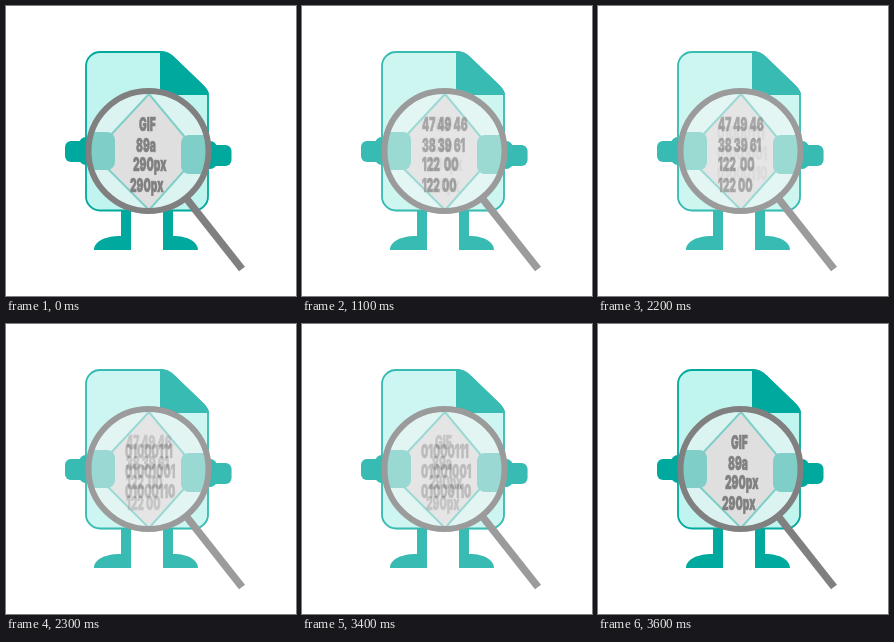
An HTML page that plays this animation: 290x290 px, repeating every 3.7 s.

```html
<!DOCTYPE html>
<html lang="en">
<head>
<meta charset="utf-8">
<title>File under a magnifier</title>
<style>
  html, body { margin: 0; width: 100%; height: 100%; overflow: hidden; background: #fff; }
  svg { display: block; width: 290px; height: 290px; }
  text { font: 900 19px Inter, sans-serif; fill: #808080; stroke: #808080; stroke-width: .7; white-space: pre; }
</style>
</head>
<body>
<svg viewBox="0 0 290 290">
  <defs>
    <clipPath id="glass"><circle cx="142.5" cy="145" r="61"/></clipPath>
    <g id="scene">
      <g fill="#00a99d">
        <!-- legs -->
        <path d="M115 204H125V244H88C88 236 98 230 115 230Z"/>
        <path d="M157 204H167V230C182 230 192 236 192 244H157Z"/>
        <!-- hands -->
        <rect x="59" y="135" width="40" height="21" rx="6"/>
        <rect x="73" y="131" width="30" height="28" rx="7"/>
        <rect x="186" y="139" width="39.5" height="21" rx="6"/>
        <rect x="184" y="135" width="27" height="28" rx="7"/>
      </g>
      <!-- page with folded corner -->
      <path d="M94 46H155Q162 46 168 52L197 80Q202 85 202 90V190A14 14 0 0 1 188 204.5H94A14 14 0 0 1 80 190V60A14 14 0 0 1 94 46Z"
        fill="#c0f4ee" stroke="#00a99d" stroke-width="1.8"/>
      <path d="M154 45Q162 45 169 52L198 80Q203 85 203 89H154Z" fill="#00a99d"/>
      <!-- magnifier -->
      <path d="M180 192L236 263" stroke="#808080" stroke-width="7.5"/>
      <g clip-path="url(#glass)">
        <circle cx="142.5" cy="145" r="61" fill="#dcf4f1"/>
        <path d="M143 88L87 148L143 204L193 148Z" fill="#dfdfdf" stroke="#7fcfc8" stroke-width="2"/>
        <g fill="#7fcfc8">
          <rect x="70" y="126" width="39" height="38" rx="8"/>
          <rect x="175" y="129" width="45" height="39" rx="8"/>
        </g>
      </g>
      <circle cx="142.5" cy="145" r="60" fill="none" stroke="#808080" stroke-width="6"/>
    </g>
  </defs>
</svg>
<script>
const HOLD = 1000, STEP = 100, SLOT = HOLD + 2 * STEP, LOOP = 3700;
const CONDENSE = 0.54;

// Lines are [x, baseline, text]
const views = {
  bin: [[119, 134, "01000111"], [119, 154, "01001001"], [119, 174, "01000110"]],
  gif: [[133, 125, "GIF"], [130, 146, "89a"], [127, 165, "290px"], [124, 186, "290px"]],
  hex: [[120, 125, "47 49 46"], [120, 146, "38 39 61"], [120, 165, "122  00"], [120, 186, "122 00"]]
};

const line = ([x, y, s]) =>
  `<text transform="translate(${x} ${y}) scale(${CONDENSE} 1)">${s}</text>`;

// Stacking order matters while two views are blended
document.querySelector("svg").insertAdjacentHTML("beforeend",
  Object.entries(views).map(([id, lines]) =>
    `<g id="${id}"><use href="#scene"/>${lines.map(line).join("")}</g>`).join(""));

const order = ["gif", "hex", "bin"].map(id => document.getElementById(id));
const start = performance.now();

function draw(now) {
  const t = Math.max(0, now - start) % LOOP;
  const slot = Math.floor(t / SLOT) % 3, u = t % SLOT;
  const mix = u < HOLD ? 0 : (Math.floor((u - HOLD) / STEP) + 1) / 3;
  order.forEach((g, i) => {
    const a = i === slot ? 1 - mix : i === (slot + 1) % 3 ? mix : 0;
    g.setAttribute("opacity", a);
  });
  requestAnimationFrame(draw);
}
draw(start);
</script>
</body>
</html>
```
